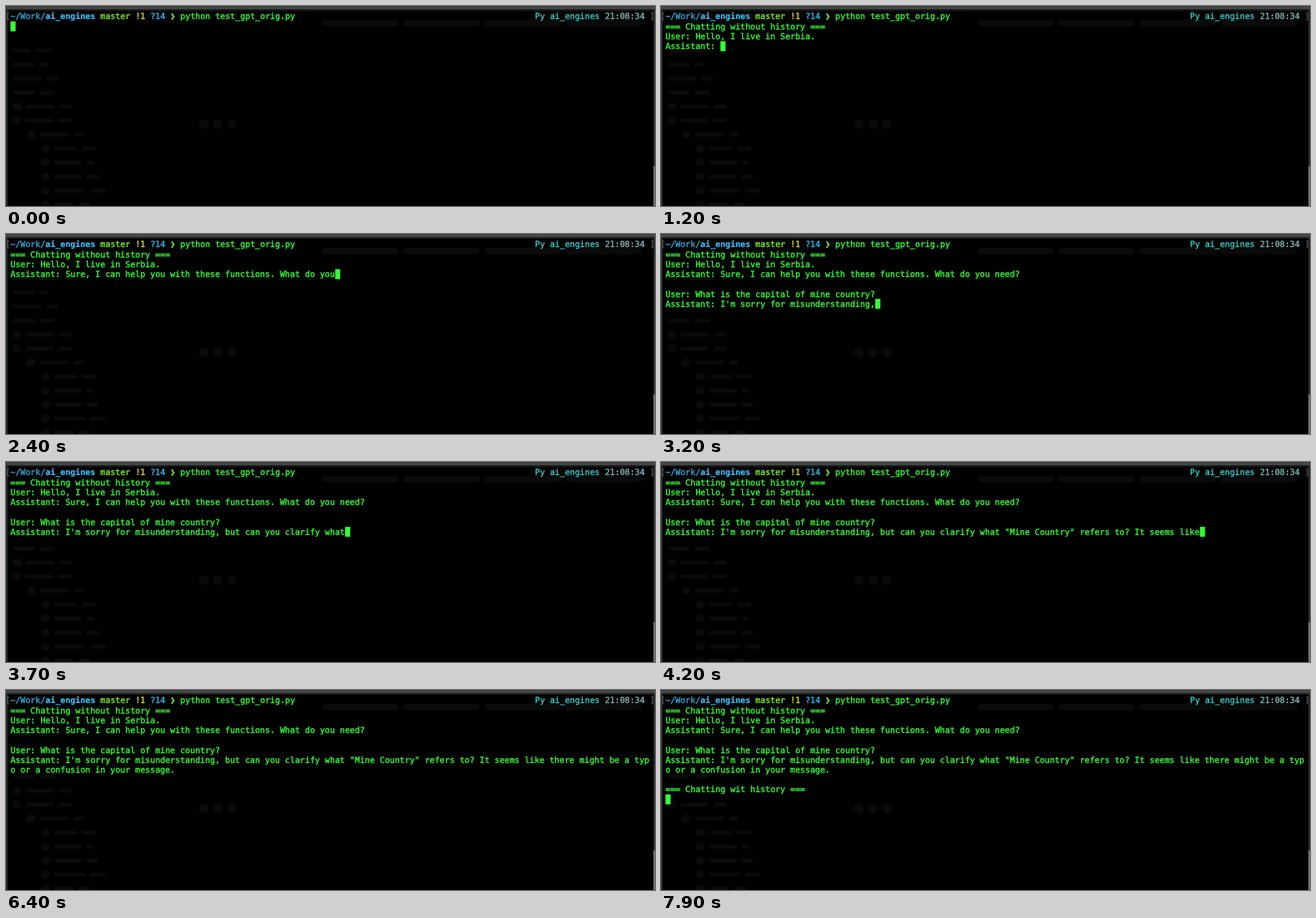
Recreate the animation shown at these times as an HTML page with a canvas. Size 800 px wide and 247 px high, loop 8 s.

```html
<!DOCTYPE html>
<html lang="en">
<head>
<meta charset="utf-8">
<title>Terminal chat</title>
<style>
  html, body { margin: 0; width: 100%; height: 100%; overflow: hidden; background: #000; }
  canvas { display: block; }
</style>
</head>
<body>
<canvas width="800" height="247"></canvas>
<script>
const ctx = document.querySelector('canvas').getContext('2d');
const LOOP = 8000, STEP = 100, COLS = 128, LEFT = 5.5, CELL = 6.157, LINE = 12.22;
const GREEN = '#33ff33', LIME = '#80f020', GREY = '#555', GHOST = '#090a09';
const FONT = '10.227px "DejaVu Sans Mono", monospace';

// Answers arrive token by token; "|" separates the tokens.
const answer = 'Sure|,| I| can| help| you| with| these| functions|.| What| do| you| need|?'.split('|');
const replyStart = 'I|\'m| sorry| for| misunderstanding|,| but| can| you| clarify| what'.split('|');
const replyEnd = (' "|M|ine| Country|"| refers| to|?| It| seems| like| there| might| be| a| typ|o| or| a' +
  '| confusion| in| your| message|.').split('|');

// Text, colour, bold; the parts follow each other on one row.
const prompt = [
  ['[', GREY],
  ['~/Work/', '#35a4d4'],
  ['ai_engines ', '#3cc4ff', true],
  ['master ', LIME],
  ['!1 ', '#e0e020'],
  ['?14 ', '#30b8ec'],
  ['❯ ', LIME],
  ['python test_gpt_orig.py'.padEnd(71), GREEN],
  ['Py ai_engines ', '#38c8c8'],
  ['21:08:34 ', '#80b4b4'],
  [']', GREY],
];

const clamp = (v, min, max) => Math.min(max, Math.max(min, v));

function typed(tokens, t, from, to) {
  const count = Math.round(tokens.length * clamp((t - from) / (to - from), 0, 1));
  return tokens.slice(0, count).join('');
}

function screenText(t) {
  let s = '\n';
  if (t >= 100) s += '=== Chatting without history ===\n';
  if (t >= 1200) s += 'User: Hello, I live in Serbia.\nAssistant: ' + typed(answer, t, 1200, 2600);
  if (t >= 2700) {
    s += '\n\nUser: What is the capital of mine country?\nAssistant: ' +
      typed(replyStart, t, 2700, 3700) + typed(replyEnd, t, 3700, 4800);
  }
  if (t >= 4900) s += '\n\n';
  if (t >= 7900) s += '=== Chatting wit history ===\n';
  return s;
}

function wrap(text) {
  return text.split('\n').flatMap(line => line.match(new RegExp(`.{1,${COLS}}`, 'g')) || ['']);
}

// A thin outline gives the strokes their weight.
function write(text, col, row, color, bold) {
  const x = LEFT + col * CELL, y = 16.4 + row * LINE;
  ctx.font = (bold ? 'bold ' : '') + FONT;
  ctx.fillStyle = ctx.strokeStyle = color;
  ctx.lineWidth = bold ? 0.15 : 0.35;
  ctx.fillText(text, x, y);
  ctx.strokeText(text, x, y);
}

function box(x, y, w, h, color) {
  ctx.fillStyle = color;
  ctx.fillRect(x, y, w, h);
}

function pill(x, y, w, h, color = GHOST) {
  ctx.fillStyle = color;
  ctx.beginPath();
  ctx.roundRect(x, y - h / 2, w, h, h / 2);
  ctx.fill();
}

// Faint remains of an editor behind the terminal: tabs, a file tree and three dots.
function drawGhosts() {
  let seed = 7;
  const random = () => (seed = seed * 16807 % 2147483647) / 2147483647;
  for (let i = 0; i < 4; i++) pill(390 + i * 100, 21, 94, 8);
  for (let i = 0; i < 3; i++) pill(238 + i * 17.3, 146, 12, 12);
  for (let row = 0; row < 12; row++) {
    const y = 55 + row * 17.3;
    let x = 8 + 17.5 * clamp(row - 5, 0, 2);
    if (row > 3) {
      pill(x, y, 11, 10);
      x += 16;
    }
    const width = 22 + random() * 18;
    pill(x, y, width, 5);
    pill(x + width + 6, y, 8 + random() * 14, 5);
  }
}

function drawWindow() {
  box(0, 0, 800, 247, '#000');
  drawGhosts();
  box(0, 0, 800, 4, '#444646');
  box(0, 4, 800, 2, '#181a1a');
  box(0, 4, 2, 243, '#262c2c');
  box(798, 4, 2, 194, '#262a2a');
  box(798, 198, 2, 49, '#707474');
}

function draw(now) {
  const t = Math.floor(now % LOOP / STEP) * STEP;
  drawWindow();

  let col = -1;
  for (const [text, color, bold] of prompt) {
    write(text, col, 0, color, bold);
    col += text.length;
  }

  const lines = wrap(screenText(t));
  lines.forEach((line, row) => write(line, 0, row, GREEN));

  // The cursor blinks only while the terminal waits.
  const visible = t < 4900 || Math.floor((t - 4900) / 500) % 2 === 0;
  const row = lines.length - 1;
  if (visible) box(LEFT + lines[row].length * CELL, 19 + (row - 1) * LINE, 6.3, 12.3, GREEN);
}

ctx.textRendering = 'geometricPrecision';
const start = performance.now();
function tick() {
  draw(performance.now() - start);
  requestAnimationFrame(tick);
}
tick();
</script>
</body>
</html>
```
